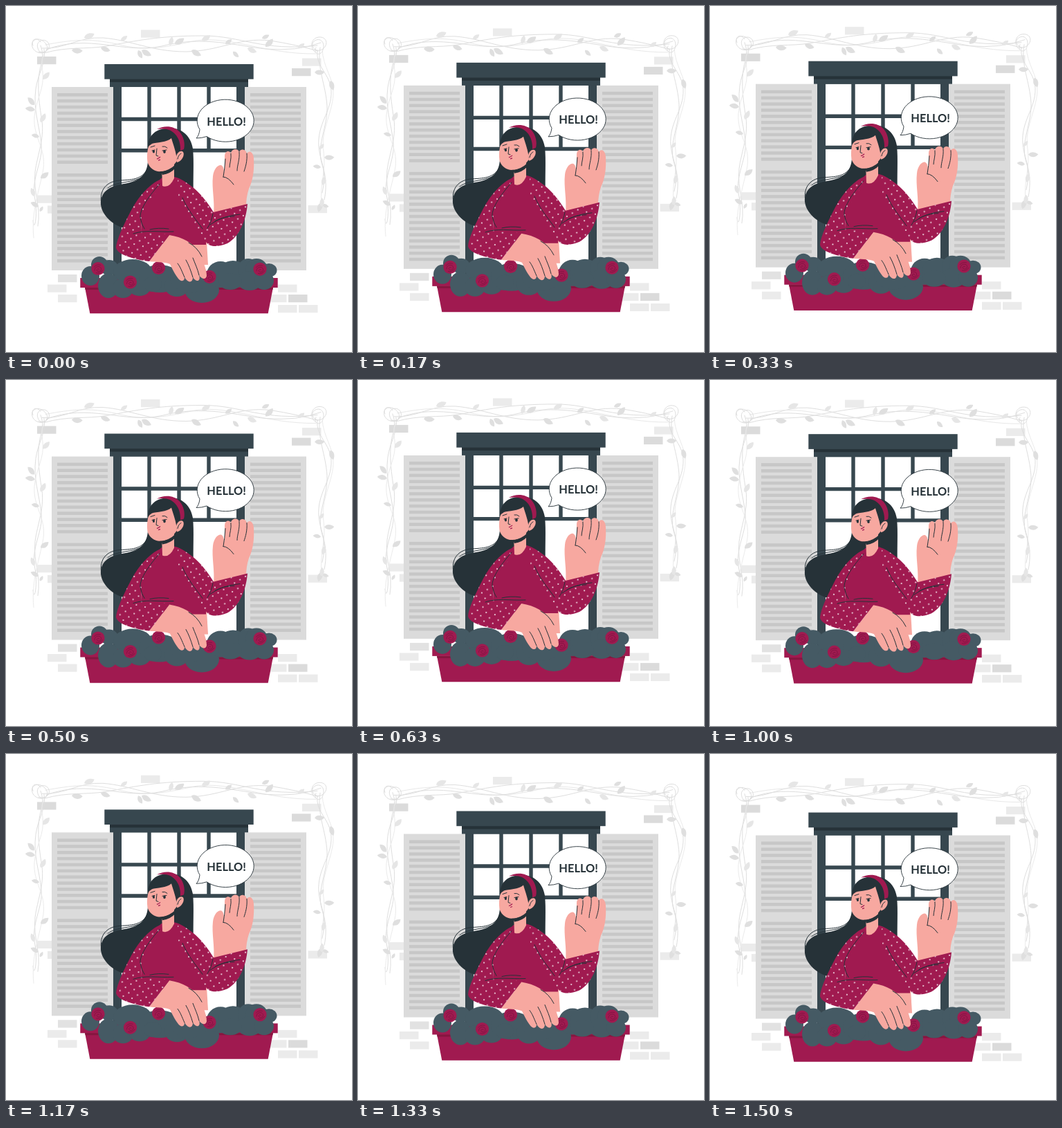
Recreate the animation shown at these times as an HTML page. Size 500 by 500 pixels, loop 1540 ms.

```html
<!DOCTYPE html>
<html lang="en">
<head>
<meta charset="utf-8">
<title>Hello from the window</title>
<style>
  html, body { margin: 0; width: 100%; height: 100%; overflow: hidden; background: #fff; }
  svg { display: block; width: 100vw; height: 100vh; }
  .ink { fill: none; stroke: #263238; stroke-width: 1; stroke-linecap: round; stroke-linejoin: round; }
  .vine { fill: none; stroke: #dedede; stroke-width: 1; stroke-linecap: round; }
  .red { fill: #a01a50; }
  .skin { fill: #f7a8a0; }
  .dark { fill: #263238; }
  .slate { fill: #37474f; }
</style>
</head>
<body>
<svg viewBox="0 0 500 500">
  <defs>
    <pattern id="dots" width="13" height="13" patternUnits="userSpaceOnUse" patternTransform="rotate(14)">
      <circle cx="3" cy="3" r=".95" fill="#fff"/>
      <circle cx="9.5" cy="9.5" r=".95" fill="#fff"/>
    </pattern>
    <path id="leaf" d="M0 0C2 -5 8 -6 14 -3C11 3 5 4 0 0Z"/>
    <path id="sleeveL" d="M224 250C206 258 190 277 179 299C168 320 160 338 159 349C160 359 184 366 207 369L236 331C224 327 207 326 197 329C191 310 203 282 224 262Z"/>
    <path id="sleeveR" d="M248 249C270 257 288 278 300 298L349 286C347 309 338 333 320 343C306 349 294 348 290 342C275 323 260 294 249 274Z"/>
    <g id="rose">
      <circle r="9.6" class="red"/>
      <path d="M-6 -2Q-2 -7 4 -5M-5 3Q-5 -3 1 -3Q6 -2 4 3Q0 6 -2 2Q-1 -1 2 1M-3 6Q3 8 7 2" fill="none" stroke="#7d143f" stroke-width=".8"/>
    </g>
  </defs>

  <g id="scene">
    <g id="bricks"></g>

    <g class="vine">
      <path d="M39 310C41 330 46 300 42 280C35 250 54 225 51 200C48 170 39 150 43 120C46 97 58 84 55 62"/>
      <path d="M46 318C51 290 39 270 42 240C45 215 57 190 51 160C47 135 44 105 51 84Q55 70 50 57"/>
      <path d="M40 335C36 295 49 265 54 235C58 205 39 190 41 160C43 135 56 120 53 95Q48 75 60 62" stroke="#ebebeb"/>
      <path d="M52 61C85 63 105 44 140 46C180 49 210 66 260 66C310 65 335 45 382 50Q420 56 451 65"/>
      <path d="M55 68C90 58 115 63 145 58C190 50 220 43 285 43C340 43 370 66 450 57"/>
      <path d="M57 56C95 49 120 46 160 55C205 67 235 58 275 50C325 43 375 70 448 69" stroke="#e8e8e8"/>
      <path d="M58 63C120 39 170 70 225 58C285 42 335 58 375 62Q420 66 455 53"/>
      <path d="M57 66C48 72 35 63 38 53C42 44 55 48 59 57C63 67 49 72 46 61C42 49 58 45 62 55C65 65 52 69 47 66M39 57C35 48 45 44 50 52"/>
      <path d="M447 67C438 60 441 46 452 45C464 44 466 56 458 62C449 69 438 58 445 51C454 44 463 53 457 66C452 73 444 68 448 60"/>
      <path d="M450 65C447 88 469 98 470 123C471 153 449 170 452 204C455 230 467 245 460 280"/>
      <path d="M457 63C458 89 474 104 473 128C471 157 454 181 459 211C463 239 453 255 456 286" stroke="#ebebeb"/>
      <path d="M454 60C449 91 462 112 464 145C465 174 449 200 456 226Q463 245 457 270"/>
    </g>
    <g id="leaves"></g>
    <g id="shutters"></g>

    <rect x="155" y="108" width="190" height="290" class="slate"/>
    <rect x="167" y="117" width="166" height="281" fill="#fff"/>
    <path d="M207 116V208M250 116V208M293 116V208M166 163.5H334M166 208.7H334" stroke="#37474f" stroke-width="5.4"/>
    <rect x="150" y="105" width="200" height="12" class="slate"/>
    <rect x="150" y="105" width="200" height="5" class="dark"/>
    <rect x="142.3" y="84" width="215.4" height="21.7" class="slate"/>

    <path d="M280 178.5A41 30.5 0 1 1 290 188.5Q283 191 275 191Q279 187 280 178.5Z" fill="#fff" stroke="#263238" stroke-width=".9"/>
    <text x="318.6" y="172.6" text-anchor="middle" font-family="Lato, sans-serif" font-weight="700" font-size="16.4" fill="#263238">HELLO!</text>

    <!-- back hair -->
    <path class="dark" d="M232 177C252 174 267 187 270 206C272 225 270 250 271 275L215 275L180 322C160 322 139 305 137 287C136 269 149 260 170 257C195 253 205 242 205 222Z"/>
    <path class="ink" d="M205 233C199 250 184 251 165 252C146 253 134 265 138 286M204 242C190 257 160 252 147 263"/>

    <!-- body -->
    <path class="skin" d="M262 340H290L292 374H250Z"/>
    <path class="red" d="M224 249C232 246 239 245 247 248C265 254 283 277 292 302L289 345H232L195 335L196 290Z"/>
    <path class="skin" d="M225 232L226 260Q236 264 243 249V228Z"/>
    <path class="dark" d="M224 239Q236 238 245 229L244 235Q238 242 226 244Z"/>

    <!-- head -->
    <path class="skin" d="M207 199C204 208 203 219 205 227C208 235 216 240 224 239C235 238 242 231 247 224L249 190L225 184Z"/>
    <path class="dark" d="M205 205C205 189 214 178 232 177C247 177 257 190 257 209L256 217L247 224C246 210 242 202 239 191C233 197 217 197 211 199Q207 201 205 205Z"/>
    <path class="red" d="M218 178C229 172 243 173 251 182C257 189 259 199 257 207L252 209C253 195 246 181 232 178Q225 177 218 178Z"/>
    <path class="skin" d="M246 218C247 211 253 208 256 211C259 216 253 225 247 226Z"/>
    <path class="ink" stroke-width=".8" d="M253 213Q249 215 248 221M218 206L217 216L220 217M209 204L215 202M226 203Q230 202 233 205M211 209L215 208M226 209L232 208"/>
    <ellipse class="dark" cx="213.4" cy="210.3" rx="1.6" ry="2.2"/>
    <ellipse class="dark" cx="229" cy="210.5" rx="1.8" ry="2.4"/>
    <path d="M218 221Q221 220 223 218M220 223L223 222" fill="none" stroke="#a01a50" stroke-width="1.3"/>

    <!-- raised hand -->
    <path class="skin" d="M300 301C302 282 297 263 299 246C300 236 306 229 311 230C315 232 314 237 316 240L316 217C316 209 323 208 325 213C326 206 335 205 337 211C339 205 347 207 348 213C352 207 358 212 358 221C359 236 357 252 351 264Q347 276 347 290Z"/>
    <path class="ink" d="M325 213C326 221 323 228 323 233M337 211C338 222 334 230 334 238M348 213C349 224 346 233 344 239M317 221Q316 236 314 247M314 247Q321 247 329 258"/>

    <use href="#sleeveR" class="red"/>
    <use href="#sleeveR" fill="url(#dots)"/>
    <path class="ink" d="M255 277C263 296 275 309 284 322M299 300Q297 312 291 321M295 316Q312 303 338 301M302 311Q314 304 330 304"/>

    <!-- planter and plants -->
    <rect x="107.3" y="393" width="285.4" height="14" class="red"/>
    <path class="red" d="M114 406.5H386L378.7 444.3H121.3Z"/>
    <path d="M114 407H386L385.4 410H114.6Z" fill="#85163f"/>
    <g id="bush" fill="#455a64"></g>
    <g id="roses"></g>

    <!-- resting arm -->
    <path class="skin" d="M236 331C256 334 270 343 278 354C284 366 290 380 290 390C289 396 283 395 279 389C282 398 275 400 270 392C270 400 263 401 258 392C258 399 252 398 249 394C243 386 240 379 237 373C228 369 217 371 207 369Z"/>
    <path class="ink" d="M279 389C277 380 273 372 270 364M270 392C267 382 264 374 260 367M258 392C254 383 252 377 248 372M264 342Q276 348 283 362"/>
    <use href="#sleeveL" class="red"/>
    <use href="#sleeveL" fill="url(#dots)"/>
    <path class="ink" d="M222 257C208 273 193 293 194 306Q196 316 200 322M184 329C201 323 219 327 242 326M208 323Q220 320 235 322"/>
  </g>
</svg>
<script>
const $ = id => document.getElementById(id);
const rect = (x, y, w, h, fill) => `<rect x="${x}" y="${y}" width="${w}" height="${h}" fill="${fill}"/>`;
const fill = (id, list, draw) => { $(id).innerHTML = list.map(draw).join(''); };

const LIGHT = '#ebebeb', MID = '#dbdbdb';
fill('bricks', [
  [195, 34.5, LIGHT], [45, 73, MID], [428, 75.5, LIGHT], [413, 90, MID],
  [45, 273.5, LIGHT], [60, 288.5, LIGHT], [436.5, 288, LIGHT],
  [75, 388, '#e2e2e2'], [60, 402.5, LIGHT], [75, 417, LIGHT],
  [393, 402.5, LIGHT], [378, 417, LIGHT], [408, 417, MID],
  [393, 432, LIGHT], [423, 432, LIGHT]
], ([x, y, c]) => rect(x, y, 27.5, 11.2, c));

// x, y of the stem end, angle, scale
fill('leaves', [
  [53, 106, -35, 1], [41, 143, -120, 1], [42, 150, 200, 1], [50, 168, -50, 1],
  [48, 189, 205, .8], [50, 249, -25, 1], [41, 275, -100, .9], [47, 290, 220, .9], [49, 297, -50, .6],
  [113, 46, -10, 1.1], [95, 64, 15, 1.1], [137, 60, 30, 1], [166, 50, -25, .8],
  [191, 64, 75, .9], [196, 64, 40, 1.1], [237, 57, -65, .9], [244, 55, -20, 1.1],
  [268, 64, 40, 1.1], [283, 50, -20, 1], [317, 55, -25, .8], [328, 66, 55, .8],
  [349, 61, 35, 1], [375, 59, -35, 1.1], [370, 47, -15, .8], [422, 61, -25, .8],
  [446, 96, 10, 1], [469, 108, 85, 1], [453, 207, -40, .7], [460, 219, 10, 1],
  [455, 233, 200, .8], [458, 259, -70, .9], [457, 287, 30, .7], [456, 284, 120, 1], [456, 290, -75, .9]
], ([x, y, a, s], i) =>
  `<use href="#leaf" transform="translate(${x} ${y}) rotate(${a}) scale(${s})" fill="${i % 3 ? '#dfdfdf' : '#e6e6e6'}"/>`);

const slats = (x, y, n) => Array.from({ length: n }, (_, i) => rect(x, y + i * 8.85, 73, 4.6, '#c7c7c7')).join('');
fill('shutters', [66, 345], x =>
  rect(x, 117, 89, 265, MID) + slats(x + 8, 126, 12) + slats(x + 8, 242, 15));

// cx, cy, rx, ry
fill('bush', [
  [122, 390, 13, 14], [135, 374, 12, 12], [149, 378, 13, 11], [183, 384, 28, 18],
  [148, 404, 15, 18], [169, 408, 15, 14], [193, 406, 16, 13], [222, 394, 30, 20],
  [247, 404, 18, 16], [283, 410, 25, 19], [265, 393, 28, 21], [310, 388, 20, 19],
  [328, 388, 22, 20], [350, 380, 15, 15], [362, 380, 16, 15], [380, 382, 11.5, 10],
  [352, 397, 18, 14], [373, 397, 14, 13], [324, 398, 17, 12], [212, 402, 13, 11]
], ([x, y, rx, ry]) => `<ellipse cx="${x}" cy="${y}" rx="${rx}" ry="${ry}"/>`);

fill('roses', [[133, 379.5], [179.5, 399], [220.5, 378.5], [294, 391.3], [367, 380.3]],
  ([x, y]) => `<use href="#rose" x="${x}" y="${y}"/>`);

// The whole scene floats up and down at constant speed, in 24 steps per second.
const LOOP = 1540, RISE = 10, PEAK = 725, LOW = .6;
function show(ms) {
  const t = Math.floor((ms % LOOP + 5) * 24 / 1000) * 1000 / 24;
  let d = Math.abs(t - PEAK);
  d = Math.min(d, LOOP - d);
  const dy = LOW - RISE * (1 - d / (LOOP / 2));
  $('scene').setAttribute('transform', `translate(0 ${dy.toFixed(3)})`);
}

const start = performance.now();
function tick() {
  show(performance.now() - start);
  requestAnimationFrame(tick);
}
show(0);
requestAnimationFrame(tick);
</script>
</body>
</html>
```
